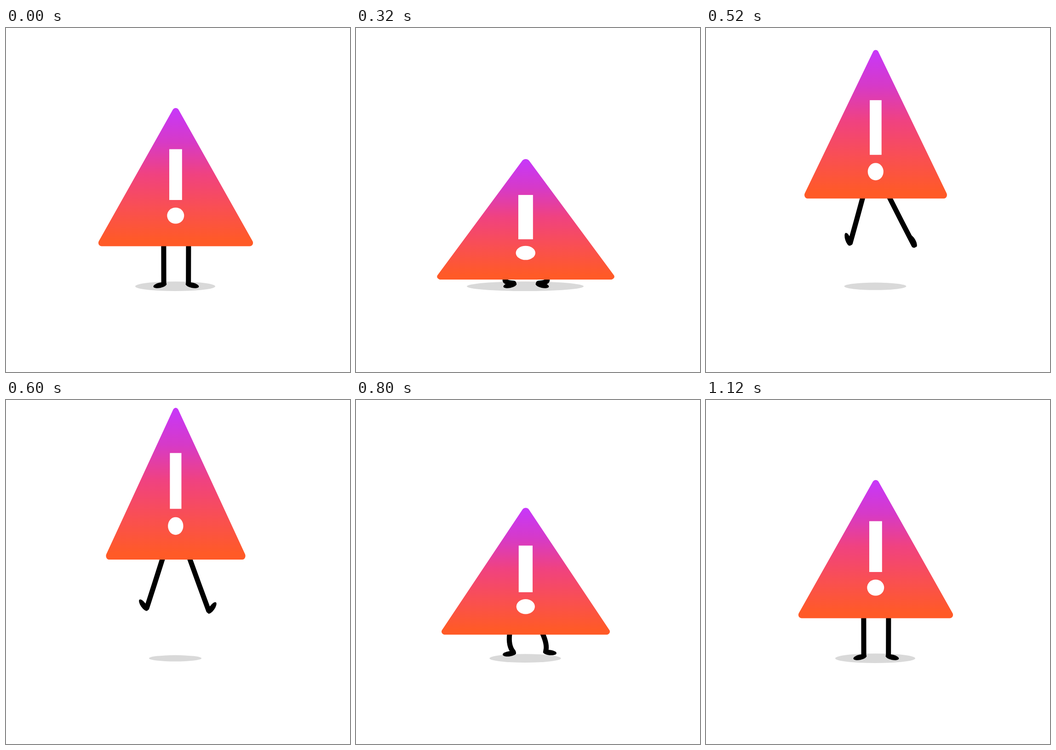
Animation of 748x748 px, one loop 1.16 s. Source, as an HTML page with a canvas:

```html
<!DOCTYPE html>
<html lang="en">
<head>
<meta charset="utf-8">
<title>Jumping warning sign</title>
<style>
  html, body { margin: 0; width: 100%; height: 100%; overflow: hidden; background: #fff; }
  canvas { display: block; width: 100vw; height: 100vh; }
</style>
</head>
<body>
<canvas id="stage" width="748" height="748"></canvas>
<script>
const ctx = document.getElementById('stage').getContext('2d');
const LOOP = 1160, STEP = 40;
const CX = 369, LEG_CX = 369.9;
const REST_Y = 474.5, BODY_H = 300.5, HALF_BASE = 173.3, CORNER = 7.3;
// Moments of the jump, in ms.
const PUSH = 342, LIFT = 360, APEX = 600, LAND = 840, REBOUND = 960, REST = 1120;

const mix = (a, b, u) => a + (b - a) * u;
const span = (t, a, b) => Math.min(1, Math.max(0, (t - a) / (b - a)));
const bump = (t, a, b) => Math.sin(Math.PI * span(t, a, b));
const soft = u => (1 - Math.cos(Math.PI * u)) / 2;
const out = u => Math.sin(u * Math.PI / 2);
const cubic = u => u < 0.5 ? 4 * u ** 3 : 1 - 4 * (1 - u) ** 3;

// A value that moves through stages of [from, to, value, easing].
const path = (first, ...stages) => t =>
  stages.reduce((v, [a, b, next, ease]) => mix(v, next, ease(span(t, a, b))), first);

const rebound = path(0, [LAND, REBOUND, 1, soft], [REBOUND, REST, 0, soft]);
const baseY = path(REST_Y, [0, 300, 547, out], [PUSH, APEX, 347, cubic],
  [APEX, LAND, 522, soft], [LAND, REBOUND, REST_Y, soft]);
const baseH = path(BODY_H, [0, 320, 262, soft], [320, APEX, 330, out],
  [APEX, LAND, 272, soft], [LAND, REBOUND, BODY_H, soft]);
const shadowR = path(87, [0, 300, 127, out], [LIFT, APEX, 57, cubic], [APEX, 920, 87, soft]);

const bottom = t => baseY(t) + 1.2 * rebound(t);
const height = t => baseH(t) + 11.5 * rebound(t);

// spread and rise: foot travel at the apex; splay and flick: extra swing on the way.
const makeLeg = (side, land, spread, rise, splay, flick) => ({
  side, land, spread, rise, splay, flick,
  lift: path(0, [LIFT, APEX, 1, cubic], [APEX, land, 0, soft]),
  kick: path(0, [LIFT, APEX, 1, out], [APEX, land, 0, soft])
});
const legs = [
  makeLeg(-1, LAND, 37, 103, -3, 30),
  makeLeg(1, LAND + 10, 44, 97, 20, 84)
];

function ellipse(x, y, rx, ry) {
  ctx.beginPath();
  ctx.ellipse(x, y, rx, ry, 0, 0, Math.PI * 2);
  ctx.fill();
}

function drawLeg(leg, t) {
  const y = bottom(t), kick = leg.kick(t);
  const squat = Math.max(0, (y - REST_Y) / 53.5);
  const up = bump(t, LIFT, APEX), down = bump(t, APEX, leg.land);
  const hip = 27 + 13 * squat + 2.5 * kick;
  const footX = 26.8 + leg.spread * kick + leg.splay * (up + down);
  const footY = 555 - leg.rise * leg.lift(t);
  const kneeX = (hip + footX) / 2 + 11 * squat;
  const kneeY = mix(y, footY, 0.5 + 0.2 * squat);

  ctx.save();
  ctx.translate(LEG_CX, 0);
  ctx.scale(leg.side, 1);
  ctx.strokeStyle = ctx.fillStyle = '#000';
  ctx.lineWidth = 11;
  ctx.lineCap = 'round';
  ctx.beginPath();
  ctx.moveTo(hip, y - 2);
  ctx.quadraticCurveTo(kneeX, kneeY, footX, footY);
  ctx.stroke();
  ctx.translate(footX, footY);
  ctx.rotate((12 - 67 * kick - leg.flick * up) * Math.PI / 180);
  ellipse(9, 2.6, 14.7, 5.7);
  ctx.restore();
}

const fill = ctx.createLinearGradient(0, 0, 0, BODY_H);
['#c737fb', '#d63ac8', '#f04280', '#f94f53', '#ff5a27']
  .forEach((color, i) => fill.addColorStop(i * 0.24, color));

function drawBody(t) {
  const h = height(t), sy = h / BODY_H;
  const sx = 1 / sy + 0.013 * rebound(t) - 0.009 * legs[0].lift(t);
  ctx.save();
  ctx.translate(CX, bottom(t) - h);
  ctx.scale(sx, sy);

  ctx.fillStyle = fill;
  ctx.beginPath();
  ctx.moveTo(0, BODY_H);
  ctx.arcTo(-HALF_BASE, BODY_H, 0, -7.5, CORNER);
  ctx.arcTo(0, -7.5, HALF_BASE, BODY_H, CORNER);
  ctx.arcTo(HALF_BASE, BODY_H, 0, BODY_H, CORNER);
  ctx.closePath();
  ctx.fill();

  // The exclamation mark lags behind during take-off.
  ctx.translate(0, 14 * bump(t, LIFT, APEX) + 3.5 * rebound(t));
  ctx.fillStyle = '#fff';
  ctx.fillRect(-14, 89.5, 27.8, 110.5);
  ellipse(-0.2, 234, 18.5, 17.6);
  ctx.restore();
}

function draw(t) {
  ctx.fillStyle = '#fff';
  ctx.fillRect(0, 0, 748, 748);
  const r = shadowR(t);
  ctx.fillStyle = '#d9d9d9';
  ellipse(368, 561.7, r, Math.min(10.4, r * 0.12));
  legs.forEach(leg => drawLeg(leg, t));
  drawBody(t);
}

const start = performance.now();
function frame() {
  const t = (performance.now() - start) % LOOP;
  draw(Math.floor(t / STEP) * STEP);
  requestAnimationFrame(frame);
}
frame();
</script>
</body>
</html>
```
